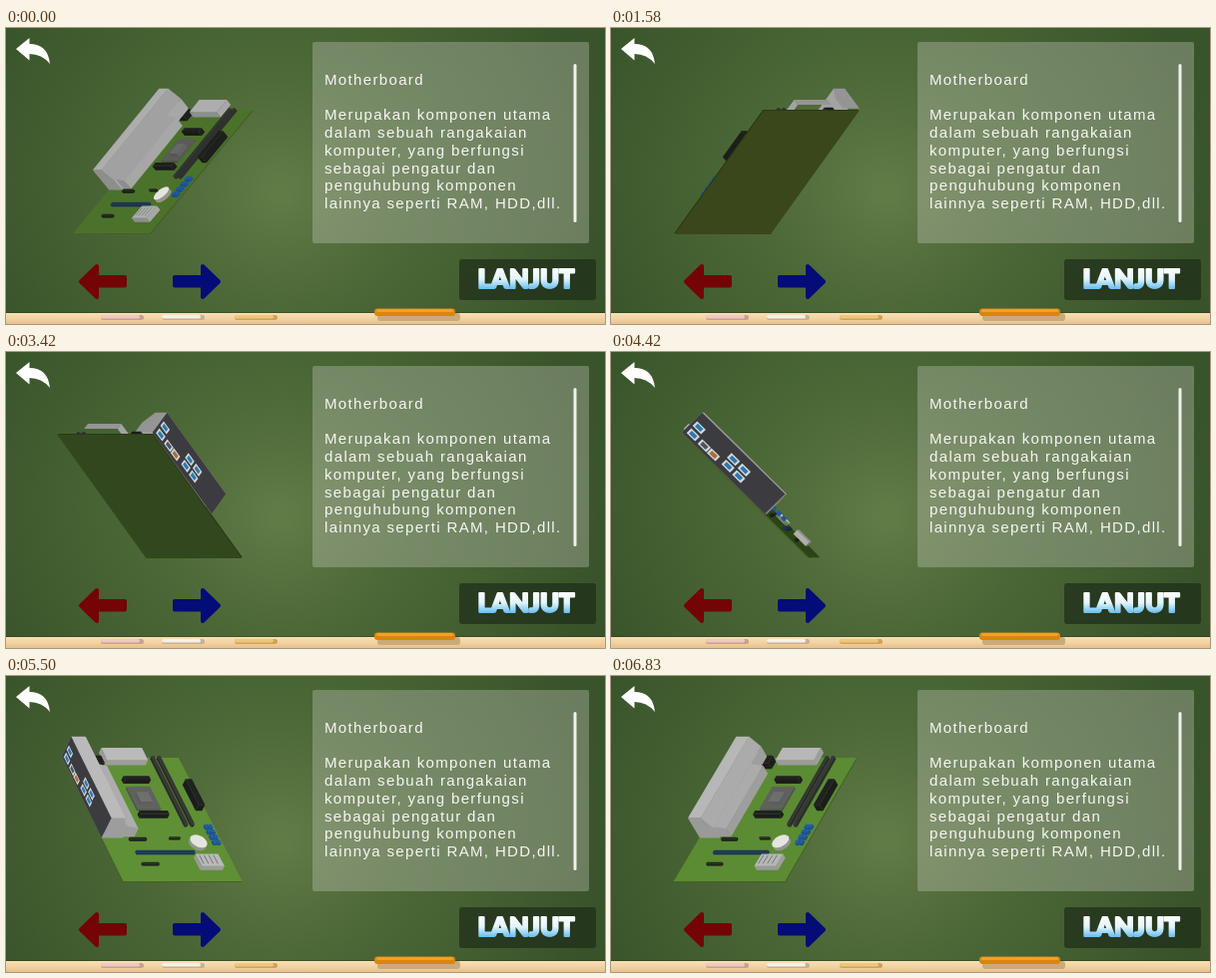
An HTML page with a canvas that plays this animation: 600x297 px, repeating every 6910 ms.

```html
<!DOCTYPE html>
<html lang="id">
<head>
<meta charset="utf-8">
<title>Motherboard</title>
<style>
html, body { margin: 0; width: 100%; height: 100%; overflow: hidden; background: #405c2e; }
canvas { display: block; width: 600px; height: 297px; }
</style>
</head>
<body>
<canvas id="stage" width="600" height="297"></canvas>
<script>
const ctx = document.getElementById('stage').getContext('2d');
const LOOP = 6910, STEP = 250 / 3;
const START = 55.5, TURN = 340.5 / 82;
let sin = 0, cos = 1;

const rgb = (c, k = 1) => `rgb(${c.map(v => Math.round(Math.min(255, v * k)))})`;

function poly(points, fill) {
  ctx.beginPath();
  points.forEach(([x, y]) => ctx.lineTo(x, y));
  ctx.closePath();
  ctx.fillStyle = fill;
  ctx.fill();
}

function round(x, y, w, h, r, fill) {
  ctx.beginPath();
  ctx.roundRect(x, y, w, h, r);
  ctx.fillStyle = fill;
  ctx.fill();
}

function gradient(g, ...colours) {
  colours.forEach((c, i) => g.addColorStop(i / (colours.length - 1), c));
  return g;
}

// ---------- model: u across the board, v up the board, h above it ----------
const depth = (u, v, h) => (u - .5) * 137 * sin + (54 - 124 * v + h) * cos;

function project([u, v, h]) {
  const x = (u - .5) * 137 * cos + (124 * v - 54 - h) * sin;
  return [150 + x * (1 + depth(u, v, h) / 3000), 206 - 124 * v - h];
}

const face = (points, fill) => poly(points.map(project), fill);

const GREY = [208, 208, 208], BLACK = [36, 38, 36], DARK = [58, 60, 58];
const BLUE = [36, 104, 196], NAVY = [34, 62, 104], GREEN = [104, 158, 58];

// h is the height at u0, h1 the height at u1
const box = (u0, u1, v0, v1, h, colour, { h1 = h, extra } = {}) => ({ u0, u1, v0, v1, h, h1, colour, extra });

function drawBox({ u0, u1, v0, v1, h, h1, colour, extra }) {
  const side = (u, top) => [[u, v0, 0], [u, v1, 0], [u, v1, top], [u, v0, top]];
  const end = v => [[u0, v, 0], [u1, v, 0], [u1, v, h1], [u0, v, h]];
  face(end(cos > 0 ? v0 : v1), rgb(colour, .54 + .25 * Math.abs(cos)));
  face(sin > 0 ? side(u1, h1) : side(u0, h), rgb(colour, .64 + .2 * Math.abs(sin)));
  if (cos > 0) {
    const slope = h1 < h ? .06 : 0;
    face([[u0, v0, h], [u1, v0, h1], [u1, v1, h1], [u0, v1, h]], rgb(colour, .72 + .2 * cos - slope));
  }
  if (extra) extra();
}

function port(v, h, colour) {
  const rect = (dv, dh) => [[0, v - dv, h - dh], [0, v + dv, h - dh], [0, v + dv, h + dh], [0, v - dv, h + dh]];
  face(rect(.034, 2.3), '#d2dade');
  face(rect(.022, 1.4), colour);
}

function ports() {
  if (sin > 0) return;
  face([[0, .35, 0], [0, 1.01, 0], [0, 1.01, 20], [0, .35, 20]], '#3c3c40');
  for (const [v, h] of [[.96, 11], [.955, 4.5], [.695, 12], [.69, 6], [.61, 12], [.605, 6]]) {
    port(v, h, '#2e78ae');
  }
  port(.867, 4.5, '#4e5459');
  port(.794, 4.5, '#ad6c36');
}

function contacts() {
  if (cos < 0) return;
  for (let u = .71; u < .87; u += .04) {
    face([[u, .11, 4], [u + .009, .11, 4], [u + .009, .18, 4], [u, .18, 4]], '#73777a');
  }
}

function disc(u, v, h, fill) {
  const ring = Array.from({ length: 24 }, (_, i) => {
    const a = i * Math.PI / 12;
    return [u + .067 * Math.cos(a), v + .052 * Math.sin(a), h];
  });
  face(ring, fill);
}

const parts = [
  box(0, .12, .35, 1.01, 20, GREY, { extra: ports }),
  box(.12, .18, .35, 1.01, 20, GREY, { h1: 10 }),
  box(.18, .28, .36, .87, 10, GREY, { h1: 8 }),
  box(.2, .29, .91, .97, 6, BLACK),
  box(.33, .68, .94, 1.04, 5, GREY),
  box(.41, .61, .57, .75, 2, [108, 110, 106]),
  box(.46, .56, .62, .7, 3, [124, 126, 122]),
  box(.41, .63, .79, .82, 4, BLACK),
  box(.4, .64, .51, .54, 4, BLACK),
  box(.745, .768, .44, .99, 3, DARK),
  box(.8, .823, .44, .99, 3, DARK),
  box(.915, .97, .57, .78, 6, BLACK),
  box(.22, .71, .215, .235, 2, NAVY),
  box(.22, .36, .325, .34, 2, BLACK),
  box(.22, .36, .125, .14, 2, BLACK),
  box(.56, .65, .335, .345, 2, BLACK),
  box(.69, .88, .09, .19, 4, GREY, { extra: contacts })
];
for (let i = 0; i < 8; i++) {
  const u = .91 + (i % 2) * .035, v = .29 + (i >> 1) * .042;
  parts.push(box(u, u + .026, v, v + .026, 2.5, BLUE));
}

const centre = p => depth((p.u0 + p.u1) / 2, (p.v0 + p.v1) / 2, p.h / 2);

function drawBoard() {
  const sheet = h => [[0, 0, h], [1, 0, h], [1, 1, h], [0, 1, h]];
  const sorted = parts.slice().sort((a, b) => centre(a) - centre(b));
  if (cos < 0) {
    sorted.forEach(drawBox);
    face(sheet(0), '#2b3915');
    face(sheet(-1), sin > 0 ? '#39471a' : '#33471e');
    return;
  }
  face(sheet(-1), '#456026');
  face(sheet(0), rgb(GREEN, .36 + .64 * cos));
  for (let h = 0; h < 3; h++) disc(.78, .3, h, '#94968e');
  disc(.78, .3, 3, '#e4e5df');
  sorted.forEach(drawBox);
}

// ---------- static scene ----------
function backdrop() {
  ctx.fillStyle = gradient(ctx.createLinearGradient(0, 0, 0, 297), '#405e2f', '#425f30', '#3f5b2d');
  ctx.fillRect(0, 0, 600, 297);
  ctx.fillStyle = gradient(ctx.createRadialGradient(275, 165, 10, 275, 165, 320),
    'rgba(122,146,88,.55)', 'rgba(92,118,66,.28)', 'rgba(40,62,32,.3)');
  ctx.fillRect(0, 0, 600, 297);
}

function chalk(x, colour, shade) {
  round(x, 288, 43, 5, 2.5, shade);
  round(x, 288, 39, 3.5, 1.7, colour);
}

function ledge() {
  ctx.fillStyle = 'rgba(24,42,18,.3)';
  ctx.fillRect(0, 285, 600, 1);
  ctx.fillStyle = gradient(ctx.createLinearGradient(0, 286, 0, 297), '#f8dfb4', '#f2d3a2', '#e8c08a');
  ctx.fillRect(0, 286, 600, 11);
  chalk(95, '#efc9c0', '#c9a08e');
  chalk(156, '#f7f0e4', '#c4b294');
  chalk(229, '#f0c67c', '#cfa25c');
  round(372, 286, 83, 8, 3, '#c9ab7a');
  round(369, 281.5, 81, 7.5, 3, '#d9860f');
  round(371, 282, 77, 3, 1.5, '#f0a02c');
}

function backArrow() {
  ctx.fillStyle = '#fff';
  ctx.fill(new Path2D('M10 21 L23.5 10 V16 Q42 16 44 36 Q36 26 23.5 26 V32.5 Z'));
}

function arrow(tip, dir, colour) {
  const x = d => tip + dir * d;
  const points = [[x(2), 254.5], [x(18), 239], [x(18), 250], [x(46), 250], [x(46), 258.5], [x(18), 258.5], [x(18), 270]];
  poly(points, colour);
  ctx.strokeStyle = colour;
  ctx.lineWidth = 4;
  ctx.lineJoin = 'round';
  ctx.stroke();
}

const LINES = ['Motherboard', '', 'Merupakan komponen utama', 'dalam sebuah rangakaian',
  'komputer, yang berfungsi', 'sebagai pengatur dan', 'penguhubung komponen',
  'lainnya seperti RAM, HDD,dll.'];

function infoPanel() {
  round(307, 14, 277, 202, 2, 'rgba(190,192,178,.38)');
  round(568.5, 36, 3, 159, 1.5, '#f0f1ec');
  ctx.font = '15px "Liberation Sans", Arial, sans-serif';
  ctx.letterSpacing = '1.35px';
  ctx.textAlign = 'left';
  ctx.fillStyle = '#f6f7f3';
  LINES.forEach((line, i) => ctx.fillText(line, 319, 56.5 + i * 17.8));
}

function nextButton() {
  round(454, 232, 137, 41, 3, 'rgba(28,42,24,.68)');
  ctx.font = '900 25.5px Lato, sans-serif';
  ctx.letterSpacing = '0px';
  ctx.textAlign = 'center';
  ctx.lineJoin = 'round';
  ctx.lineWidth = 2;
  const ink = gradient(ctx.createLinearGradient(0, 240, 0, 263), '#ffffff', '#e4f5fd', '#58b8f0');
  ctx.strokeStyle = ink;
  ctx.fillStyle = ink;
  ctx.strokeText('LANJUT', 521, 260.5);
  ctx.fillText('LANJUT', 521, 260.5);
}

// ---------- time ----------
function frameAt(t) {
  const k = Math.floor(t / STEP) + 1;
  return Math.round(k * STEP / 10) * 10 > t ? k - 1 : k;
}

function render(now) {
  const angle = (START + frameAt(now % LOOP) * TURN) * Math.PI / 180;
  sin = Math.sin(angle);
  cos = Math.cos(angle);
  backdrop();
  ledge();
  backArrow();
  arrow(73, 1, '#740406');
  arrow(215, -1, '#040c78');
  infoPanel();
  nextButton();
  drawBoard();
}

const begin = performance.now();
function tick() {
  render(performance.now() - begin);
  requestAnimationFrame(tick);
}
tick();
</script>
</body>
</html>
```
